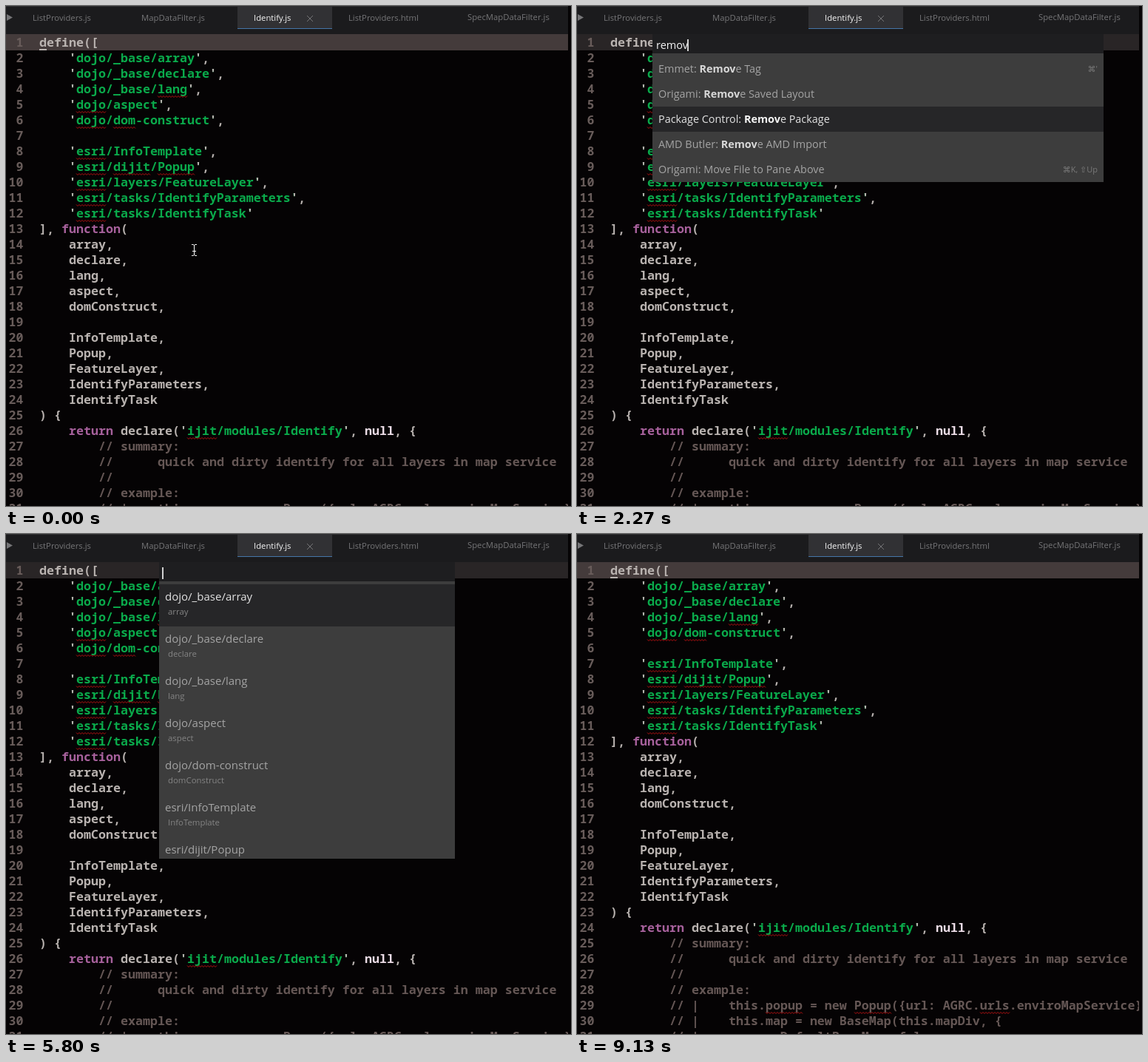
These frames come from a looping animation (764x676 px, 9190 ms). An HTML page with a canvas:

```html
<!DOCTYPE html>
<html lang="en">
<head>
<meta charset="utf-8">
<title>Removing an AMD import</title>
<style>
  html, body { margin: 0; width: 100%; height: 100%; overflow: hidden; background: #050304; }
  canvas { display: block; }
</style>
</head>
<body>
<canvas id="stage" width="764" height="676"></canvas>
<script>
const ctx = document.getElementById('stage').getContext('2d');
const W = 764, H = 676, EDGE = 760, LOOP = 9190;
const MONO = '600 16.667px "Noto Sans Mono", monospace';
const ui = (size, weight = 500) => `${weight} ${size}px "Open Sans", "Noto Sans", "DejaVu Sans", sans-serif`;

const C = {
  bg: '#050304', bar: '#1b1b1d', barTop: '#303032', tab: '#313134', tabLine: '#4576a8',
  tabText: '#757577', line: '#443b3b', dimLine: '#292526',
  number: '#685c5a', code: '#b9b3b0', string: '#0aaa4b', keyword: '#a7619c',
  literal: '#ecdce6', comment: '#655755', wave: '#b41212',
  panel: '#3d3d3d', input: '#1e1e20', row: '#262628', caret: '#d0d0d0',
  item: '#a4a4a4', match: '#d8d8d8', active: '#e2e2e2', hint: '#7a7a7a', sub: '#848484', white: '#f5f5f5'
};

// Times of the user's actions in ms
const OPEN = 935, PICK = 4470, REMOVED = 6530;
const typed = (word, times) => times.map((at, i) => [at, word.slice(0, i + 1)]);
const commandKeys = [[OPEN, ''], ...typed('remove a', [1930, 2000, 2070, 2140, 2240, 2340, 2530, 2670])];
const importKeys = [[PICK, ''], ...typed('asp', [6070, 6200, 6270])];

const modules = [
  ['dojo/_base/array', 'array'], ['dojo/_base/declare', 'declare'], ['dojo/_base/lang', 'lang'],
  ['dojo/aspect', 'aspect'], ['dojo/dom-construct', 'domConstruct'], null,
  ['esri/InfoTemplate', 'InfoTemplate'], ['esri/dijit/Popup', 'Popup'],
  ['esri/layers/FeatureLayer', 'FeatureLayer'],
  ['esri/tasks/IdentifyParameters', 'IdentifyParameters'], ['esri/tasks/IdentifyTask', 'IdentifyTask']
];

function buildCode(list) {
  const end = i => i < list.length - 1 ? ',' : '';
  return [
    'define([',
    ...list.map((m, i) => m ? `    '${m[0]}'${end(i)}` : ''),
    '], function(',
    ...list.map((m, i) => m ? `    ${m[1]}${end(i)}` : ''),
    ') {',
    "    return declare('ijit/modules/Identify', null, {",
    '        // summary:',
    '        //      quick and dirty identify for all layers in map service',
    '        //',
    '        // example:',
    '        // |    this.popup = new Popup({url: AGRC.urls.enviroMapService});',
    '        // |    this.map = new BaseMap(this.mapDiv, {',
    '        // |        useDefaultBaseMap: false'
  ].slice(0, 31);
}
const before = buildCode(modules);
const after = buildCode(modules.filter(m => !m || m[1] !== 'aspect'));

// Asterisks enclose the matched part of an entry
const allCommands = [
  [':$ – EOF'], [':0 – BOF'], [':e – Revert'], [':w – Save', '⌘S'],
  ['AMD Butler: Add AMD Import'], ['AMD Butler: Remove AMD Import'], ['AMD Butler: Sort AMD Imports'],
  ['ANF: Copy Current File'], ['ANF: Delete Current File'], ['ANF: Delete File'], ['ANF: New File', '⌥⌘N']
];
const removeCommands = [
  ['Emmet: Remove Tag', '⌘\''], ['Origami: Remove Saved Layout'], ['Package Control: Remove Package'],
  ['AMD Butler: Remove AMD Import'], ['Origami: Move File to Pane Above', '⌘K, ⇧Up']
];
const finalCommands = [
  ['AMD Butler: *Remove A*MD Import'], ['Emmet: *Remove* T*a*g', '⌘\''],
  ['Origami: *Remove* S*a*ved Layout'], ['Package Control: *Remove* P*a*ckage']
];

function rect(x, y, w, h, color) {
  ctx.fillStyle = color;
  ctx.fillRect(x, y, w, h);
}

function text(str, x, y, font, color, align = 'left') {
  ctx.font = font;
  ctx.fillStyle = color;
  ctx.textAlign = align;
  ctx.fillText(str, x, y);
  return ctx.measureText(str).width;
}

function path(points, fill, stroke, close) {
  ctx.beginPath();
  points.forEach(([x, y]) => ctx.lineTo(x, y));
  if (close) ctx.closePath();
  if (fill) { ctx.fillStyle = fill; ctx.fill(); }
  if (stroke) { ctx.strokeStyle = stroke; ctx.lineWidth = 1; ctx.stroke(); }
}

function wave(x, y, width) {
  const points = [];
  for (let i = 0; i <= width; i += 2) points.push([x + i, y + (i % 4 ? 2 : 0)]);
  path(points, null, C.wave);
}

function tokenColor(token) {
  if (token.startsWith('//')) return C.comment;
  if (token.startsWith("'")) return C.string;
  if (/^(function|return)$/.test(token)) return C.keyword;
  return token === 'null' ? C.literal : C.code;
}

function codeLine(line, y) {
  const tokens = /\/\/.*|'[^']*'|\b(?:function|return|null)\b|[^\s'](?:(?!\bfunction\b)[^\s'])*/g;
  for (const { 0: token, index } of line.matchAll(tokens)) {
    const x = 45 + index * 10, color = tokenColor(token);
    text(token, x, y, MONO, color);
    if (color === C.string) {
      text("'", x, y, MONO, C.code);
      text("'", x + (token.length - 1) * 10, y, MONO, C.code);
    }
    if (color === C.string || color === C.comment) {
      const unknown = /\b(?:dojo(?!\/_)|lang|dom|esri|dijit|popup|ijit|urls)\b/gi;
      for (const hit of token.matchAll(unknown)) wave(x + hit.index * 10, y + 3.5, hit[0].length * 10);
    }
  }
}

function editor(lines, focused) {
  rect(0, 38, EDGE, 22, focused ? C.line : C.dimLine);
  lines.forEach((line, i) => {
    const y = 55 + i * 21;
    text(String(i + 1), 23.5, y, MONO, C.number, 'right');
    codeLine(line, y);
  });
  if (focused) rect(45, 58, 10, 2, C.code);
}

function tabs() {
  rect(0, 0, EDGE, 38, C.bar);
  rect(0, 0, EDGE, 1, C.barTop);
  rect(313, 1, 128, 29, C.tab);
  rect(313, 30, 128, 1, C.tabLine);
  path([[1, 11], [9, 15.5], [1, 20]], C.tabText, null, true);
  const font = ui(11.3);
  text('ListProviders.js', 36, 20, font, C.tabText);
  text('MapDataFilter.js', 183, 20, font, C.tabText);
  text('Identify.js', 335, 20, font, C.white);
  text('ListProviders.html', 463, 20, font, C.tabText);
  text('SpecMapDataFilter.js', 624, 19, font, C.tabText);
  path([[407, 13], [415, 21]], null, C.tabText);
  path([[415, 13], [407, 21]], null, C.tabText);
}

function label(str, x, y, size, active) {
  str.split('*').forEach((part, i) => {
    const bold = i % 2;
    const color = active ? (bold ? C.white : C.active) : (bold ? C.match : C.item);
    x += text(part, x, y, ui(size, bold ? 700 : 500), color);
  });
}

function panel({ x, width, rows, rowHeight, size, selected, query, caret }) {
  const bottom = Math.min(439, 68 + rows.length * rowHeight);
  ctx.save();
  ctx.beginPath();
  ctx.rect(x, 38, width, bottom - 38);
  ctx.clip();
  rect(x, 38, width, bottom - 38, C.panel);
  rect(x, 38, width, 26, C.input);
  rect(x, 68 + selected * rowHeight, width, rowHeight, C.row);
  const end = x + 5 + text(query, x + 5, 58, ui(14.5), C.white);
  if (caret) rect(Math.round(end) - 1, 45, 2, 16, C.caret);
  rows.forEach(([name, hint, sub], i) => {
    const y = 90 + i * rowHeight;
    label(name, x + 8, y, size, i === selected);
    if (hint) text(hint, x + width - 8, y - 1, ui(11), C.hint, 'right');
    if (sub) text(sub, x + 12, y + 19, ui(11.4, 400), C.sub);
  });
  ctx.restore();
}

const lastKey = (keys, t) => keys.filter(([at]) => at <= t).pop();
const caretOn = (t, at) => (t - at) % 1000 < 500;

function commandRows(query) {
  if (!query) return allCommands;
  if (query.length === 8) return finalCommands;
  const word = 'Remove'.slice(0, query.trim().length);
  return removeCommands.map(([name, hint]) => [name.replace(word, '*' + word + '*'), hint]);
}

function commandPalette(t) {
  const [at, query] = lastKey(commandKeys, t);
  panel({
    x: 102, width: 610, rows: commandRows(query), rowHeight: 34, size: 14.4,
    selected: query && query.length < 8 ? 2 : 0, query, caret: caretOn(t, at)
  });
}

function importPanel(t) {
  const [at, query] = lastKey(importKeys, t);
  const rows = modules.filter(m => m && m[0].includes(query))
    .map(([name, alias]) => [query ? name.replace(query, '*' + query + '*') : name, '', alias]);
  panel({
    x: 207, width: 400, rows, rowHeight: 57, size: 15,
    selected: 0, query, caret: caretOn(t, at)
  });
}

function beam() {
  path([[251, 322.5], [253.5, 322.5], [254.5, 324], [255.5, 322.5], [258, 322.5]], null, '#fff');
  path([[254.5, 324], [254.5, 336]], null, '#fff');
  path([[252, 331.5], [257, 331.5]], null, '#fff');
  path([[251, 337.5], [253.5, 337.5], [254.5, 336], [255.5, 337.5], [258, 337.5]], null, '#fff');
}

function arrow() {
  path([[253.5, 325.5], [253.5, 340], [256.7, 337], [259, 342], [261.3, 341], [259, 336], [263.5, 336]],
    '#000', '#fff', true);
}

function draw(t) {
  const focused = t < OPEN || t >= REMOVED;
  rect(0, 0, W, H, C.bg);
  ctx.save();
  ctx.beginPath();
  ctx.rect(0, 0, EDGE, H);
  ctx.clip();
  editor(t < REMOVED ? before : after, focused);
  tabs();
  ctx.restore();
  if (t < OPEN) beam();
  else if (t < PICK) commandPalette(t);
  else if (t < REMOVED) importPanel(t);
  if (t >= OPEN && t < commandKeys[1][0]) arrow();
}

const start = performance.now();
function tick() {
  draw((performance.now() - start) % LOOP);
  requestAnimationFrame(tick);
}
tick();
</script>
</body>
</html>
```
